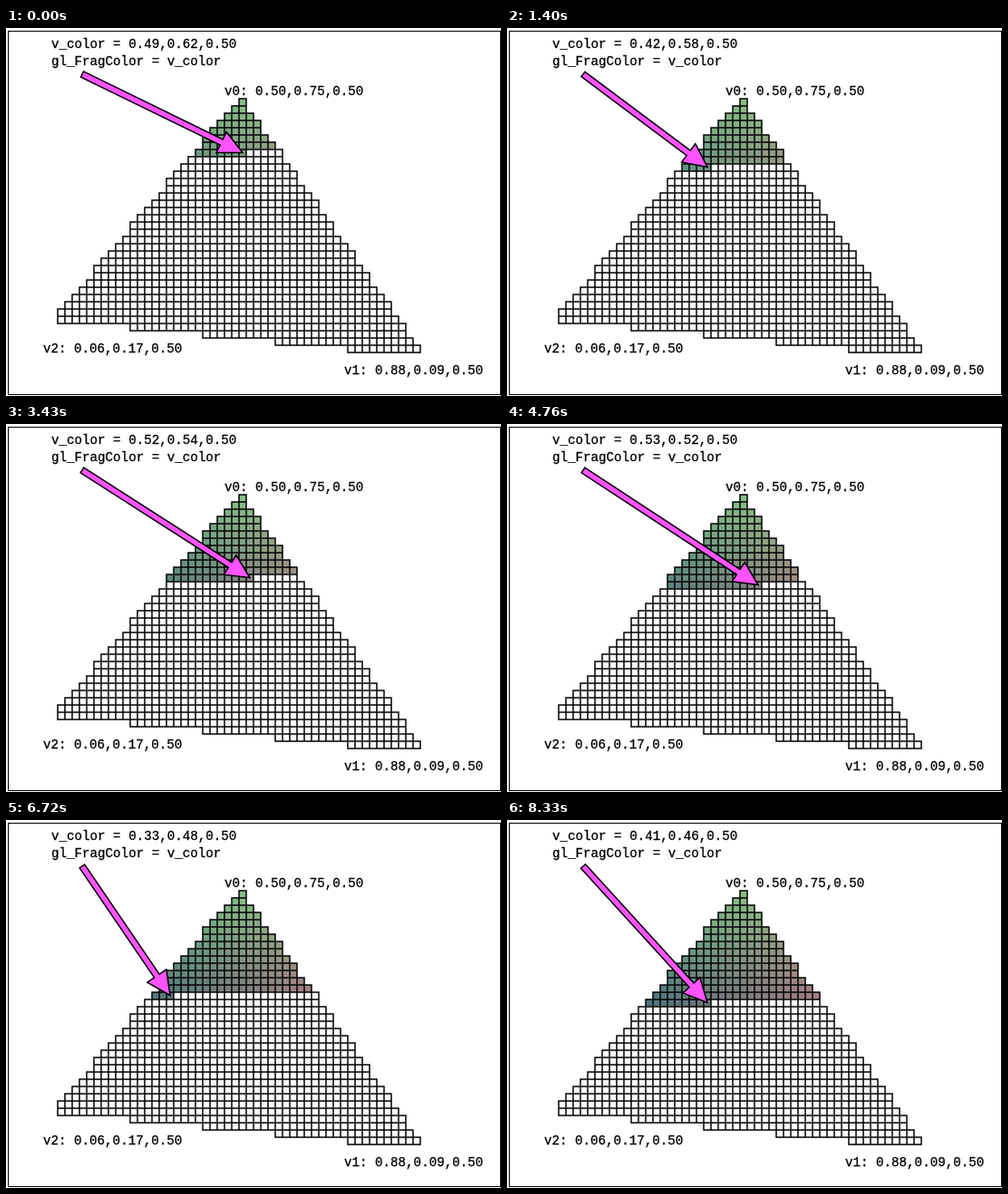
Write an HTML page with a canvas that moves like this. It is 546 by 406 pixels and loops after 8400 ms.

```html
<!DOCTYPE html>
<html>
<head>
<meta charset="utf-8">
<style>
  html, body { margin: 0; width: 100%; height: 100%; overflow: hidden; background: #fff; }
  canvas { display: block; }
</style>
</head>
<body>
<canvas id="stage" width="546" height="406"></canvas>
<script>
const ctx = document.getElementById('stage').getContext('2d');
const CELL = 8, LEFT = 57, TOP = 78, FRAME = 70, FRAMES = 120;

// Pace of the scan: [frame, number of the cell being shaded]
const PACE = [[0, 45], [20, 67], [38, 91], [49, 107], [68, 126], [96, 156], [119, 185]];

const mix = (a, b, t) => a + (b - a) * t;
const cut = v => (Math.floor(v * 100) / 100).toFixed(2);

// Slightly muted fill for a colour whose blue is always one half
function shade(red, green) {
  const grey = 0.3 * red + 0.6 * green + 0.05;
  const [r, g, b] = [red, green, 0.5].map(v => mix(v, grey, 0.18) * 255);
  return `rgb(${r}, ${g}, ${b})`;
}

// All cells of the rasterised triangle, in scan order
const cells = [];
for (let row = 0; row < 35; row++) {
  const first = row < 31 ? 25 - Math.floor((5 * row + 5) / 6) : (row - 30) * 10;
  const last = 25 + Math.floor(5 * row / 7);
  for (let col = first; col <= last; col++) {
    const across = (col - first) / Math.max(1, last - first);
    cells.push({
      x: LEFT + col * CELL,
      y: TOP + row * CELL,
      red: mix(mix(0.5, 0.065, row / 31), mix(0.5, 0.883, row / 35), across),
      green: 0.758 - 0.0194 * row
    });
  }
}

function cellAt(frame) {
  const i = PACE.findIndex(p => p[0] >= frame);
  if (i < 1) return PACE[0][1];
  const [f0, c0] = PACE[i - 1], [f1, c1] = PACE[i];
  return Math.floor(mix(c0, c1, (frame - f0) / (f1 - f0)) + 1e-6);
}

function write(text, x, y) {
  ctx.fillText(text, x, y);
  ctx.strokeText(text, x, y);
}

function drawArrow(x0, y0, x1, y1) {
  const length = Math.hypot(x1 - x0, y1 - y0), neck = length - 26;
  ctx.save();
  ctx.translate(x0, y0);
  ctx.rotate(Math.atan2(y1 - y0, x1 - x0));
  ctx.beginPath();
  ctx.moveTo(0, -3.4);
  ctx.lineTo(neck, -3.4);
  ctx.lineTo(neck, -12.7);
  ctx.lineTo(length, 0);
  ctx.lineTo(neck, 12.7);
  ctx.lineTo(neck, 3.4);
  ctx.lineTo(0, 3.4);
  ctx.closePath();
  ctx.fillStyle = '#ff54ff';
  ctx.fill();
  ctx.lineWidth = 1.5;
  ctx.stroke();
  ctx.restore();
}

function draw(now) {
  const current = cellAt(Math.floor(now / FRAME) % FRAMES);
  const { x, y, red, green } = cells[current];

  ctx.fillStyle = '#fff';
  ctx.fillRect(0, 0, 546, 406);
  ctx.strokeStyle = '#000';
  ctx.lineWidth = 1;
  ctx.strokeRect(2.5, 3.5, 543, 401);

  cells.slice(0, current + 1).forEach(c => {
    ctx.fillStyle = shade(c.red, c.green);
    ctx.fillRect(c.x, c.y, CELL, CELL);
  });
  ctx.beginPath();
  cells.forEach(c => ctx.rect(c.x, c.y, CELL, CELL));
  ctx.lineWidth = 1.5;
  ctx.stroke();

  ctx.fillStyle = '#000';
  ctx.font = '14.2px "Liberation Mono", monospace';
  ctx.lineWidth = 0.3;
  write(`v_color = ${cut(red)},${cut(green)},0.50`, 50, 22);
  write('gl_FragColor = v_color', 50, 41);
  write('v0: 0.50,0.75,0.50', 241, 74);
  write('v1: 0.88,0.09,0.50', 373, 382);
  write('v2: 0.06,0.17,0.50', 41, 358);

  drawArrow(84, 51, x + CELL / 2, y + CELL / 2 - 0.5);
}

const start = performance.now();
function tick() {
  draw(performance.now() - start);
  requestAnimationFrame(tick);
}
tick();
</script>
</body>
</html>
```
